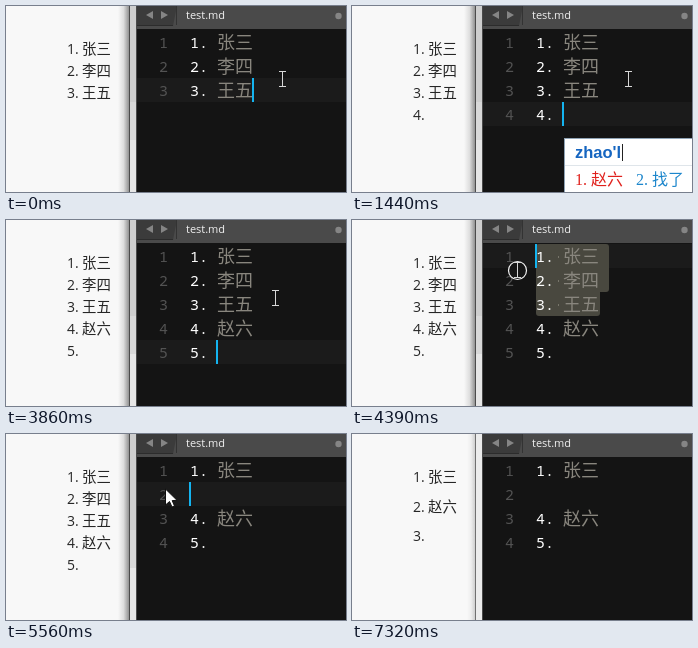
Write an HTML page with a canvas that moves like this. It is 340x186 px and loops after 8.66 s.

```html
<!DOCTYPE html>
<html lang="zh">
<head>
<meta charset="utf-8">
<title>Markdown list</title>
<style>
html, body { margin: 0; width: 100%; height: 100%; overflow: hidden; background: #f8f8f8; }
canvas { display: block; width: 340px; height: 186px; }
</style>
</head>
<body>
<canvas id="stage" width="340" height="186"></canvas>
<script>
const ctx = document.getElementById('stage').getContext('2d');
const LOOP = 8660, ROW = 24, TOP = 24;
const CJK = '"Noto Sans CJK SC", "Noto Sans CJK", sans-serif';
const MONO = '"Noto Sans Mono", monospace';

const names = ['张三', '李四', '王五', '赵六'];
const three = names.slice(0, 3);
const item = (name, i) => [i + 1 + '.', name];
const list = (...a) => a.map(item);

// Each track is a list of [start time, value].
const docs = [
  [0, list(...three)],
  [150, list(...three, '')],
  [1960, list(...names)],
  [2710, list(...names, '')],
  [5560, [['1.', '张三'], ['', ''], ['4.', '赵六'], ['5.', '']]]
];
const pages = [
  [0, { items: three, gap: 22 }],
  [990, { items: [...three, ''], gap: 22 }],
  [1960, { items: names, gap: 22 }],
  [2980, { items: [...names, ''], gap: 22 }],
  [6000, { items: ['张三', '赵六', ''], gap: 29.5 }]
];
// caret: [x, row]
const carets = [
  [0, [246, 2]], [150, [210, 3]], [1960, [246, 3]], [2710, [210, 4]],
  [4000, [246, 2]], [4120, [183, 2]], [4240, [183, 1]], [4390, [183, 0]],
  [4830, [183, 1]], [7320, null]
];
// first selected row, always ending on row 2
const selections = [[0, null], [4120, 2], [4240, 1], [4390, 0], [4830, 1], [5560, null]];
const pointers = [
  [0, [beam, 276, 73]], [3860, [beam, 269, 78]],
  [4000, [ring, 249, 84]], [4120, [ring, 200, 82]], [4240, [ring, 166, 67]],
  [4390, [ring, 165, 50]], [4670, [ring, 164, 51]], [4830, [ring, 160, 55]],
  [5100, [arrow, 159, 55]], [6710, [arrow, 169, 92]],
  [6860, [beam, 237, 170]], [7020, [beam, 254, 182]], [7170, null]
];
const inputs = [
  [0, null],
  [560, ['z', '在', '中', '最']],
  [990, ['zh', '这', '中', '找']],
  [1140, ['zha', '炸', '扎', '眨']],
  [1290, ['zhao', '找', '照', '赵']],
  [1440, ["zhao'l", '赵六', '找了']],
  [1690, ["zhao'li", '赵丽', '照例']],
  [1840, ["zhao'liu", '赵六', '照留']],
  [1960, null]
];

function at(track, t) {
  let value = track[0][1];
  for (const [start, v] of track) if (t >= start) value = v;
  return value;
}

function box(x, y, w, h, color) {
  ctx.fillStyle = color;
  ctx.fillRect(x, y, w, h);
}

function text(s, x, y, font, color) {
  ctx.font = font;
  ctx.fillStyle = color;
  ctx.fillText(s, x, y);
}

function shape(points, color, stroke) {
  ctx.beginPath();
  points.forEach(([x, y]) => ctx.lineTo(x, y));
  ctx.closePath();
  ctx.fillStyle = color;
  ctx.fill();
  if (stroke) {
    ctx.strokeStyle = stroke;
    ctx.lineWidth = 1;
    ctx.stroke();
  }
}

function beam(x, y) {
  box(x - 3, y - 8, 7, 1, '#d8d8d8');
  box(x, y - 7, 1, 14, '#d8d8d8');
  box(x - 3, y + 7, 7, 1, '#d8d8d8');
}

function ring(x, y) {
  ctx.beginPath();
  ctx.arc(x + .5, y + .5, 9, 0, Math.PI * 2);
  ctx.fillStyle = '#161616';
  ctx.fill();
  ctx.strokeStyle = '#f2f2f2';
  ctx.lineWidth = 1.2;
  ctx.stroke();
  beam(x, y);
}

function arrow(x, y) {
  const p = [[0, 0], [0, 16], [4, 12.5], [6.5, 18], [9, 17], [6.7, 11.6], [11.5, 11.3]];
  shape(p.map(([a, b]) => [x + a + .5, y + b]), '#fff', '#111');
}

function drawPage(t) {
  box(0, 0, 131, 186, '#f8f8f8');
  const { items, gap } = at(pages, t);
  items.forEach((name, i) => {
    const y = 48 + i * gap;
    text(i + 1 + '.', 61, y, '14px "Open Sans", sans-serif', '#262626');
    text(name, 76, y, '14.4px ' + CJK, '#262626');
  });
}

function drawEdge(focused) {
  const left = focused ? 112 : 115;
  const g = ctx.createLinearGradient(left, 0, 123, 0);
  g.addColorStop(0, '#f8f8f8');
  g.addColorStop(.5, focused ? '#dedede' : '#eeeeee');
  g.addColorStop(1, focused ? '#929292' : '#cfcfcf');
  box(left, 0, 123 - left, 186, g);
  box(123, 0, 1, 186, focused ? '#4c4c4c' : '#707070');
  box(124, 0, 6, 186, focused ? '#cecece' : '#ececec');
  if (focused) {
    box(124, 96, 6, 38, '#d8d8d8');
    box(124, 134, 6, 52, '#e6e6e6');
  }
  box(130, 0, 1, 186, '#4a4a4a');
}

function drawBar() {
  box(131, 0, 209, 20, '#3b3b3b');
  box(131, 19, 209, 1, '#2c2c2c');
  box(131, 20, 209, 3, '#4a4a4a');
  shape([[167, 20], [171, 0], [340, 0], [340, 20]], '#4a4a4a');
  box(170, 0, 1, 19, '#333');
  shape([[140, 9], [147, 5], [147, 13]], '#858585');
  shape([[162, 9], [155, 5], [155, 13]], '#858585');
  text('test.md', 180, 13, '11px "Open Sans", sans-serif', '#f0f0f0');
  ctx.beginPath();
  ctx.arc(332.5, 10, 3.2, 0, Math.PI * 2);
  ctx.fillStyle = '#858585';
  ctx.fill();
}

function drawSelection(first) {
  ctx.fillStyle = '#49483f';
  for (let row = first; row < 3; row++) {
    const a = row === first ? 3 : 0, b = row === 2 ? 3 : 0;
    ctx.beginPath();
    ctx.roundRect(184, TOP + row * ROW, row < 2 ? 73 : 64, ROW, [a, a, row === 1 ? 3 : b, b]);
    ctx.fill();
  }
}

function drawEditor(t) {
  box(131, 23, 209, 163, '#141414');
  const caret = at(carets, t), first = at(selections, t);
  if (caret) box(131, TOP + caret[1] * ROW, 209, ROW, '#1b1b1b');
  if (first !== null) drawSelection(first);
  at(docs, t).forEach(([mark, name], i) => {
    const y = TOP + i * ROW + 18;
    text(i + 1, 153, y, '15px ' + MONO, '#535353');
    text(mark, 184, y, '500 15px ' + MONO, '#fff');
    text(name, 211, y + 1, '300 18px ' + CJK, '#89867e');
    if (first !== null && i >= first && i < 3) box(206, y - 6, 1, 2, '#77756a');
  });
  if (caret) box(caret[0], TOP + caret[1] * ROW, 2, ROW, '#14b4f0');
}

function drawInput(entry) {
  if (!entry) return;
  const [typed, ...words] = entry;
  box(212, 132, 128, 54, '#8fa3b5');
  box(213, 133, 127, 53, '#fff');
  box(213, 159, 127, 1, '#dfe5ea');
  text(typed, 223, 152, 'bold 16.5px "Liberation Sans", sans-serif', '#1565c0');
  box(Math.round(223 + ctx.measureText(typed).width) + 1, 138, 1, 17, '#222');
  let x = 223;
  words.forEach((word, i) => {
    const color = i ? '#1c86cc' : '#e0201c';
    text(i + 1 + '.', x, 179, '16px "Liberation Serif", serif', color);
    text(word, x + 16, 179, '300 16px ' + CJK, color);
    x += 29 + 16 * word.length;
  });
}

function draw(t) {
  drawPage(t);
  drawEdge(t < 7320);
  drawEditor(t);
  drawBar();
  drawInput(at(inputs, t));
  const pointer = at(pointers, t);
  if (pointer) pointer[0](pointer[1], pointer[2]);
}

const begin = performance.now();
function tick() {
  draw((performance.now() - begin) % LOOP);
  requestAnimationFrame(tick);
}
tick();
</script>
</body>
</html>
```
